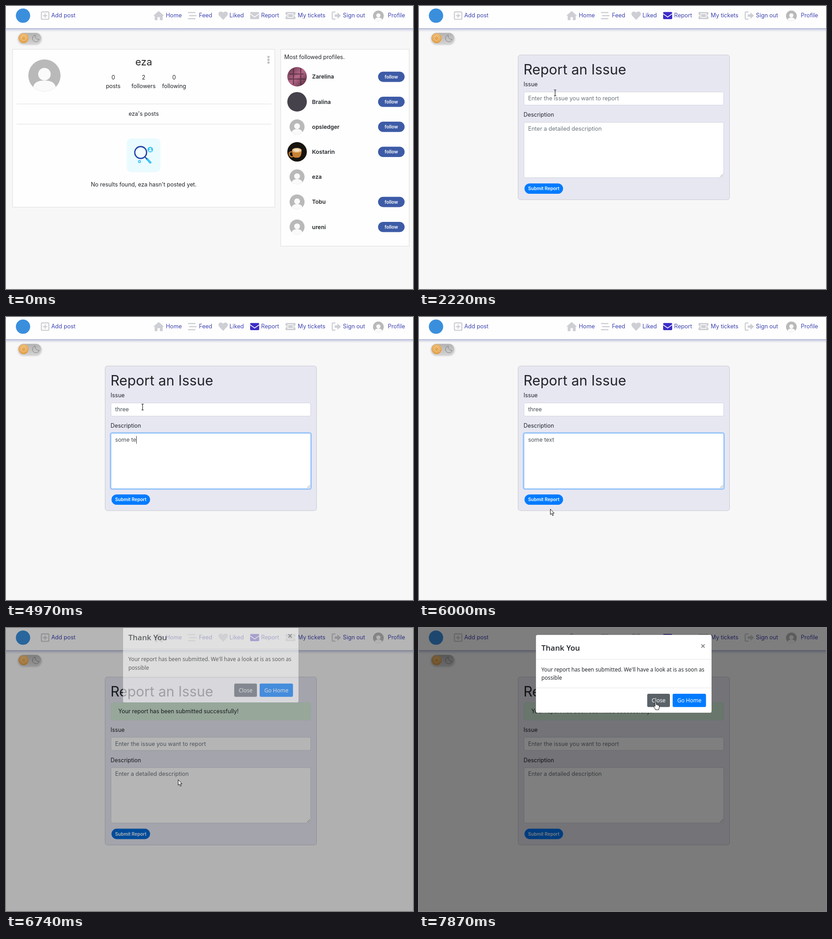
An HTML page that plays this animation: 897 px wide and 624 px high, repeating every 8000 ms.

```html
<!DOCTYPE html>
<html lang="en">
<head>
<meta charset="utf-8">
<title>Report an issue</title>
<style>
html, body { margin: 0; width: 100%; height: 100%; overflow: hidden; background: #f7f7f7; }
svg { display: block; }
text { font-family: Inter, sans-serif; font-size: 12.4px; font-optical-sizing: none; fill: #212529; white-space: pre; }
.mid { text-anchor: middle; }
.name { font-weight: 600; }
.btn { font-size: 10px; font-weight: 600; fill: #fff; text-anchor: middle; }
.nav text { font-size: 12.55px; fill: #3f45b0; }
.icon { fill: #cecfd4; }
.line { fill: none; stroke: #cecfd4; stroke-width: 2.4; stroke-linecap: round; stroke-linejoin: round; }
.hint { font-size: 12.55px; fill: #6c757d; }
.typed { fill: #495057; }
.box { fill: #fff; stroke: #ced4da; }
.card { fill: #fefefe; stroke: #dedede; }
#modal text { font-family: "Noto Sans", sans-serif; font-size: 11.72px; }
#modal .title { font-family: "Open Sans", sans-serif; font-size: 16.9px; font-weight: 600; }
#modal .action { font-size: 12px; fill: #fff; text-anchor: middle; }
</style>
</head>
<body>
<svg id="stage" width="897" height="624" viewBox="0 0 897 624">
  <defs>
    <linearGradient id="shade" x2="0" y2="1">
      <stop stop-color="#5563a8" stop-opacity=".52"/>
      <stop offset=".35" stop-color="#6270b4" stop-opacity=".22"/>
      <stop offset="1" stop-color="#6270b4" stop-opacity="0"/>
    </linearGradient>
    <linearGradient id="pill" x2="0" y2="1"><stop stop-color="#b2b2b2"/><stop offset="1" stop-color="#d0d0d0"/></linearGradient>
    <linearGradient id="knob" x2="0" y2="1"><stop stop-color="#edb465"/><stop offset="1" stop-color="#e09a40"/></linearGradient>
    <linearGradient id="rose" x2="1" y2="1"><stop stop-color="#5a2f43"/><stop offset=".5" stop-color="#b8698a"/><stop offset="1" stop-color="#4b2536"/></linearGradient>
    <filter id="soft" x="-50%" y="-50%" width="200%" height="200%"><feDropShadow dx="0" dy="2" stdDeviation="2" flood-opacity=".28"/></filter>
    <g id="person">
      <circle r="35.5" fill="#b9b9b9"/>
      <circle cy="-3" r="13.8" fill="#fafafa"/>
      <path d="M-25 25.2C-22 14 -12 11 0 11S22 14 25 25.2A35.5 35.5 0 0 1-25 25.2Z" fill="#fafafa"/>
    </g>
  </defs>
  <rect width="897" height="624" fill="#f7f7f7"/>

  <g class="nav">
    <rect width="897" height="49" fill="#fefefe"/>
    <rect y="49" width="897" height="8" fill="url(#shade)"/>
    <circle cx="37.5" cy="21.3" r="15.8" fill="#3a8fdd"/>
    <rect class="line" x="78" y="13" width="16.4" height="16.4" rx="2"/>
    <path class="line" d="M82.5 21.2h7.4M86.2 17.5v7.4"/>
    <path class="icon" d="M336.500 11L348.500 21.600H345.300V30.200Q345.300 31.200 344.300 31.200H339.200V24.500H333.800V31.200H328.700Q327.700 31.200 327.700 30.200V21.600H324.500Z"/>
    <path class="line" d="M402 14.500H416.500M404.500 21.200H419M402 28H416.500"/>
    <path class="icon" d="M478.600 30.500L470.300 22C464.500 15.500 472.500 8.500 478.600 14.800C484.700 8.500 492.700 15.500 486.900 22Z"/>
    <g id="mail">
      <path d="M538 15.200Q538 13.200 540 13.200H556Q558 13.200 558 15.200V16.300L548 23.300L538 16.300Z"/>
      <path d="M538 18.200L548 25.200L558 18.200V27Q558 29 556 29H540Q538 29 538 27Z"/>
    </g>
    <path class="icon" fill-rule="evenodd" d="M617.500 13.200H636.500Q638 13.200 638 14.700V18.500A2.600 2.600 0 0 0 638 23.700V27.500Q638 29 636.500 29H617.500Q616 29 616 27.500V23.700A2.600 2.600 0 0 0 616 18.500V14.700Q616 13.200 617.500 13.200ZM620.500 16.300V26H633.500V16.300Z"/>
    <rect class="icon" x="622" y="17.800" width="10" height="6.700"/>
    <path class="line" d="M725 13.300H721Q719 13.300 719 15.300V27Q719 29 721 29H725"/>
    <path class="icon" d="M724.500 18.600H730.500V14.200L738.300 21.200L730.500 28.200V23.800H724.500Z"/>
    <use href="#person" transform="translate(820.700 21.800) scale(.335)"/>
  </g>

  <g id="toggle">
    <rect x="27" y="59.300" width="50.700" height="23" rx="11.500" fill="url(#pill)" filter="url(#soft)"/>
    <circle cx="38.800" cy="70.900" r="11" fill="url(#knob)"/>
    <circle cx="38.800" cy="70.900" r="4.800" fill="none" stroke="#f5dbae"/>
    <circle cx="38.800" cy="70.900" r="7.300" fill="none" stroke="#f5dbae" stroke-width="2" stroke-dasharray="1.200 2.620"/>
    <path d="M64.500 64A7.500 7.500 0 1 0 73 73.500A7.800 7.800 0 0 1 64.500 64Z" fill="none" stroke="#7d7d80"/>
  </g>

  <g id="profile">
    <rect class="card" x="14.500" y="95.500" width="578" height="348"/>
    <use href="#person" x="84.700" y="153.300"/>
    <g fill="#c3c3c3"><circle cx="578.500" cy="112.300" r="2.600"/><circle cx="578.500" cy="118.500" r="2.600"/><circle cx="578.500" cy="124.700" r="2.600"/></g>
    <path d="M23 216H585M23 260.500H585" stroke="#dfdfdf"/>
    <rect x="266" y="292" width="74.500" height="74.500" rx="11" fill="#e9fbff"/>
    <path d="M310 336.500L319.500 346.500" stroke="#40c4f5" stroke-width="5"/>
    <path d="M305.500 332L311 337.800" stroke="#2146a8" stroke-width="2.500"/>
    <circle cx="296.800" cy="323" r="13" fill="#f3fdff" stroke="#2146a8" stroke-width="2.800"/>
    <circle cx="318" cy="316.600" r="6.200" fill="#40c4f5"/>
    <circle cx="318" cy="315" r="2" fill="#e9fbff"/>
    <path d="M314.500 320.300a3.500 3 0 0 1 7 0z" fill="#e9fbff"/>
    <circle cx="294.300" cy="343" r="3.300" fill="#40c4f5"/><circle cx="294.300" cy="343" r="1.200" fill="#e9fbff"/>
    <rect class="card" x="605.500" y="95.500" width="283" height="434"/>
  </g>

  <g id="report">
    <rect id="panel" x="218.500" y="108" width="466" rx="5" fill="#e7e7f2" stroke="#c8c8d2"/>
    <text x="230.200" y="151" style="font-size:30.8px">Report an Issue</text>
    <g id="alert">
      <rect x="231.500" y="165" width="440" height="38" rx="3" fill="#d4edda" stroke="#cae8d1"/>
      <text x="247.500" y="187.700">Your report has been submitted successfully!</text>
    </g>
    <g id="form">
      <text x="230.500" y="177.400">Issue</text>
      <text x="230.500" y="244.400">Description</text>
      <g id="issue"></g>
      <g id="details"></g>
      <path d="M663.500 377L670 370.500M667 377L670 374" stroke="#777" stroke-width=".9"/>
      <rect id="ring" x="231.300" y="390" width="87.400" height="25.200" rx="12.600" fill="none" stroke="#007bff" stroke-width="2.500"/>
      <rect id="submit" x="232.500" y="391.200" width="85" height="22.800" rx="11.400"/>
      <text class="btn" x="275" y="406.300">Submit Report</text>
    </g>
  </g>

  <rect id="shroud" width="897" height="624"/>
  <g id="modal">
    <rect x="257.500" y="15" width="387.500" height="172" rx="3.500" fill="#fff" stroke="#000" stroke-opacity=".2"/>
    <path d="M258 69H644.500M258 132H644.500" stroke="#dee2e6"/>
    <text class="title" x="269.800" y="49.700">Thank You</text>
    <path d="M622.300 36.200l7.200 7.200m0-7.200l-7.200 7.200" stroke="#7f7f7f" stroke-width="1.900"/>
    <text x="269.800" y="95.700">Your report has been submitted. We'll have a look at is as soon as</text>
    <text x="269.800" y="114.400">possible</text>
    <rect id="close" x="503" y="145" width="50" height="29.300" rx="3"/>
    <text class="action" x="528" y="164.300">Close</text>
    <rect x="559" y="145" width="73.500" height="29.300" rx="3" fill="#007bff"/>
    <text class="action" x="595.800" y="164.300">Go Home</text>
  </g>

  <g id="cursor" stroke-linejoin="round">
    <path id="arrow" d="M.5 .5V12.800L3.300 10.200L5.300 15L7.300 14.100L5.300 9.500H9Z" fill="#fff" stroke="#111"/>
    <path id="beam" d="M-2.500-6.500H-.8L0-5.800L.8-6.500H2.500M0-6V6M-2.500 6.500H-.8L0 5.800L.8 6.500H2.500" fill="none" stroke="#111" stroke-width="1.100"/>
    <path id="hand" d="M-1.300 8.500V.8Q-1.300-.3 0-.3T1.300 .8V5.500Q3.500 4.700 3.800 6.300Q5.800 5.700 6 7.200Q8 6.800 8 8.800V12Q7.200 14 6.800 16.800H-.2Q-.8 14.500-3.700 10.700Q-4.800 9-3.500 8.300Q-2.400 7.900-1.300 9.500Z" fill="#fff" stroke="#111"/>
  </g>
</svg>
<script>
const LOOP = 8000;
const $ = id => document.getElementById(id);
const set = (id, attrs) => { for (const k in attrs) $(id).setAttribute(k, attrs[k]); };
const show = (id, on) => set(id, { display: on ? 'inline' : 'none' });
const clamp = v => Math.max(0, Math.min(1, v));
const ramp = (t, start, ms) => clamp((t - start) / ms);
const label = (x, y, str, cls = '') => `<text x="${x}" y="${y}" class="${cls}">${str}</text>`;
const mix = (a, b, k) => `rgb(${a.map((v, i) => Math.round(v + (b[i] - v) * k))})`;

// Navigation labels
document.querySelector('.nav').insertAdjacentHTML('beforeend',
  [[99.7, 'Add post'], [352.3, 'Home'], [425.3, 'Feed'], [492.5, 'Liked'], [562.3, 'Report'],
   [643, 'My tickets'], [742.6, 'Sign out'], [841.6, 'Profile']].map(([x, s]) => label(x, 25.2, s)).join(''));

// Profile page
const user = 'eza';
const people = ['Zarelina', 'Bralina', 'opsledger', 'Kostarin', user, 'Tobu', 'ureni'];
const photos = {
  0: '<circle r="21.5" fill="url(#rose)"/><path d="M-17-6H14M-19 5H18M-8-18V17M8-19V18" stroke="#321b28" stroke-width="2.5" opacity=".55"/>',
  1: '<circle r="21.5" fill="#46424c"/>',
  3: '<circle r="21.5" fill="#17130f"/><path d="M7 1q9-1 7 6t-9 4" transform="translate(-3 -1) scale(-1 1)" fill="none" stroke="#c47a2e" stroke-width="2.5"/><path d="M-11-3H10Q10 12 2 13H-4Q-11 12-11-3Z" fill="#c98234"/><ellipse cx="-.5" cy="-3.500" rx="10.500" ry="5" fill="#e9c48f"/><ellipse cx="-.5" cy="-3.500" rx="6" ry="2.500" fill="#f6e6cb"/>'
};
$('profile').insertAdjacentHTML('beforeend',
  `<text x="303.5" y="130.5" class="mid" style="font-size:22px">${user}</text>` +
  [[236.3, 0, 'posts'], [303.2, 2, 'followers'], [370.5, 0, 'following']]
    .map(([x, n, s]) => label(x, 162, n, 'mid') + label(x, 180.7, s, 'mid')).join('') +
  label(303.5, 242, `${user}'s posts`, 'mid') +
  label(303.5, 398.3, `No results found, ${user} hasn't posted yet.`, 'mid') +
  label(613.3, 117, 'Most followed profiles.') +
  people.map((name, i) => {
    const y = 156 + i * 55.2;
    const face = photos[i] || '<use href="#person" transform="scale(.465)"/>';
    const follow = name === user ? '' :
      `<rect x="820" y="${y - 11.3}" width="58.5" height="22.7" rx="11.3" fill="#3d5ba6"/>` + label(849.2, y + 3.6, 'follow', 'btn');
    return `<g transform="translate(641.5 ${y})">${face}</g>` + label(674.6, y + 4.4, name, 'name') + follow;
  }).join(''));

// Form fields: typed text, focus glow and caret
const fields = [
  { id: 'issue', y: 189.5, h: 29, base: 208.4, hint: 'Enter the issue you want to report',
    word: 'three', keys: [3070, 3140, 3210, 3290, 3450], focus: 2390, blur: 3640 },
  { id: 'details', y: 256.5, h: 122, base: 274.8, hint: 'Enter a detailed description',
    word: 'some text', keys: [4410, 4500, 4590, 4680, 4780, 4880, 4970, 5130, 5310], focus: 3640, blur: 6140 }
];
for (const f of fields) {
  $(f.id).innerHTML =
    `<rect x="230" y="${f.y - 1.3}" width="442.6" height="${f.h + 2.6}" rx="4" fill="none" stroke="#007bff" stroke-width="2.6"/>` +
    `<rect class="box" x="231.5" y="${f.y}" width="440" height="${f.h}" rx="3"/>` +
    label(240.4, f.base, f.hint) + `<rect y="${f.base - 12.4}" width="1" height="17" fill="#333"/>`;
  [f.glow, f.frame, f.text, f.caret] = $(f.id).children;
}

function drawField(f, t, sent) {
  const glow = ramp(t, f.focus, 120) * (1 - ramp(t, f.blur, 150));
  f.glow.setAttribute('opacity', glow * .3);
  f.frame.style.stroke = mix([206, 212, 218], [128, 189, 255], glow);
  const typed = sent ? 0 : f.keys.filter(k => k <= t).length;
  const str = typed ? f.word.slice(0, typed) : f.hint;
  if (f.text.textContent !== str) f.text.textContent = str;
  f.text.setAttribute('class', typed ? 'typed' : 'hint');
  const last = typed ? f.keys[typed - 1] : f.focus;
  const on = t >= f.focus && t < f.blur && (t - last) % 1060 < 530;
  f.caret.setAttribute('opacity', on ? 1 : 0);
  f.caret.setAttribute('x', typed ? Math.round(240.4 + f.text.getComputedTextLength()) : 241);
}

// Pointer path as [time, x, y]
const path = [
  [170, 894, 445], [450, 840, 330], [720, 720, 150], [970, 638, 48], [1180, 575, 17], [1500, 580, 21],
  [1800, 576, 19], [2220, 300, 191.5], [2500, 301, 198.5], [5310, 301, 198.5], [5700, 293, 392],
  [5860, 286, 441], [6000, 289, 423], [6110, 283, 400], [6480, 283, 400], [6740, 379, 334],
  [6800, 382.5, 331], [6900, 391, 321], [7330, 488, 205], [7560, 519, 166], [7870, 521.5, 163.5]
];
const rate = (i, c) => (path[i + 1][c] - path[i][c]) / (path[i + 1][0] - path[i][0]);
function slope(i, c) {
  if (i < 1 || i > path.length - 2) return 0;
  const a = rate(i - 1, c), b = rate(i, c);
  return a * b <= 0 ? 0 : 2 * a * b / (a + b);
}
function pointer(t) {
  const end = path.length - 1;
  if (t >= path[end][0]) return path[end].slice(1);
  let i = 0;
  while (i < end - 1 && t >= path[i + 1][0]) i++;
  const span = path[i + 1][0] - path[i][0], u = clamp((t - path[i][0]) / span), v = 1 - u;
  return [1, 2].map(c => path[i][c] * v * v * (1 + 2 * u) + path[i + 1][c] * u * u * (3 - 2 * u) +
    span * u * v * (slope(i, c) * v - slope(i + 1, c) * u));
}

// CSS ease-out curve, solved by bisection
function easeOut(x) {
  let lo = 0, hi = 1;
  for (let n = 0; n < 20; n++) {
    const s = (lo + hi) / 2;
    if (1.74 * (1 - s) * s * s + s * s * s < x) lo = s; else hi = s;
  }
  return 3 * (1 - lo) * lo * lo + lo * lo * lo;
}

function draw(t) {
  const onForm = t >= 1500, sent = t >= 6500, open = t >= 6640;
  const drop = sent ? 51.4 : 0;
  const [x, y] = pointer(t);
  const over = (l, top, r, b) => x >= l && x <= r && y >= top && y <= b;

  show('profile', !onForm);
  show('report', onForm);
  show('alert', sent);
  set('mail', { fill: t >= 1080 ? '#3c2cc6' : '#cecfd4' });
  set('panel', { height: 319 + drop });
  set('form', { transform: `translate(0 ${drop})` });
  fields.forEach(f => drawField(f, t, sent));

  // The button stays dark after the click until the dialog takes focus
  const onSubmit = onForm && !open && over(232, 391 + drop, 318, 414 + drop);
  const pressed = t >= 6110 && t < 6780;
  set('submit', { fill: onSubmit || pressed ? '#0069d9' : '#007bff' });
  set('ring', { opacity: .5 * ramp(t, 6140, 150) * (1 - ramp(t, 6640, 100)) });

  const fade = ramp(t, 6660, 138);
  const onClose = open && over(503, 145, 553, 174);
  set('shroud', { opacity: fade / 2 });
  set('modal', { opacity: fade, transform: `translate(0 ${-50 * (1 - easeOut(ramp(t, 6625, 300)))})` });
  set('close', { fill: onClose ? '#5a6268' : '#6c757d' });

  const onLink = !open && (over(536, 10, 604, 32) || !onForm && over(820, 145, 878, 500) && (y - 145) % 55.2 < 23);
  const inField = onForm && !open && fields.some(f => over(231, f.y + drop, 672, f.y + f.h + drop));
  const hand = onSubmit || onClose || onLink;
  show('cursor', t >= 170);
  set('cursor', { transform: `translate(${x.toFixed(2)} ${y.toFixed(2)})` });
  show('hand', hand);
  show('beam', inField && !hand);
  show('arrow', !hand && !inField);
}

let start;
function tick(now) {
  start ??= now;
  draw((now - start) % LOOP);
  requestAnimationFrame(tick);
}
draw(0);
requestAnimationFrame(tick);
</script>
</body>
</html>
```
